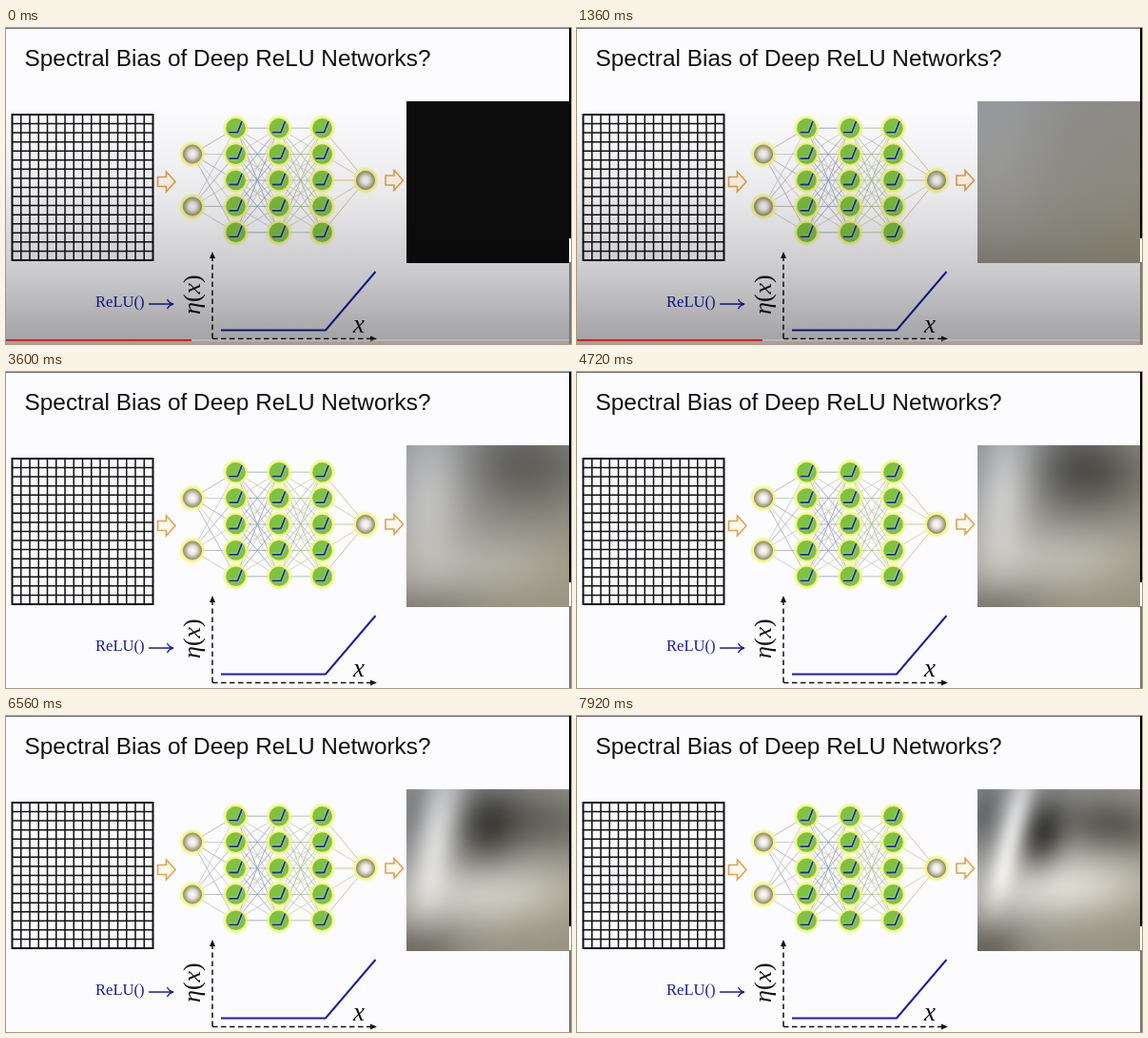
An HTML page with a canvas for the animation above (8 s loop, 594 px wide and 332 px high).

```html
<!DOCTYPE html>
<html lang="en">
<head>
<meta charset="utf-8">
<title>Spectral bias</title>
<style>
html, body { margin: 0; width: 100%; height: 100%; overflow: hidden; background: #fcfbfe; }
svg, canvas, #shade { position: absolute; left: 0; top: 0; }
canvas { left: 421px; top: 76.5px; width: 171px; height: 170.5px; }
#shade { width: 592px; height: 332px; background: linear-gradient(transparent 25%, rgba(0,0,0,.07) 52%, rgba(0,0,0,.2) 78%, rgba(0,0,0,.36)); }
#shade i { position: absolute; left: 0; top: 326.5px; height: 2.5px; width: 592px; background: rgba(255,255,255,.22); }
#shade i + i { width: 195px; background: #d8201c; }
.serif { font-family: "Liberation Serif", "Times New Roman", serif; }
</style>
</head>
<body>
<svg width="594" height="332">
  <defs>
    <radialGradient id="halo">
      <stop offset=".6" stop-color="#f2f562"/>
      <stop offset=".8" stop-color="#f2f57a" stop-opacity=".85"/>
      <stop offset="1" stop-color="#f6f8a0" stop-opacity="0"/>
    </radialGradient>
    <radialGradient id="ball">
      <stop offset="0" stop-color="#fff"/>
      <stop offset=".45" stop-color="#e6e4da"/>
      <stop offset="1" stop-color="#8f8c78"/>
    </radialGradient>
  </defs>
  <text x="19.5" y="40" font-size="24.4" font-family="'Liberation Sans', Arial, sans-serif" fill="#111">Spectral Bias of Deep ReLU Networks?</text>
  <g id="art" fill="none"></g>
  <g class="serif" fill="#111">
    <text x="94" y="293" font-size="16.6" fill="#1c1ca8">ReLU()</text>
    <text x="365" y="320" font-size="27" font-style="italic">x</text>
    <text transform="translate(204 301) rotate(-90)" font-size="26"><tspan font-style="italic">η</tspan>(<tspan font-style="italic">x</tspan>)</text>
  </g>
</svg>
<canvas id="photo" width="57" height="57"></canvas>
<div id="shade"><i></i><i></i></div>
<svg width="594" height="332">
  <path d="M0 .5H594" stroke="#77757a"/>
  <path d="M592 0h2v221h-2z"/>
  <path d="M592 221h2v25h-2z" fill="#fff"/>
  <path d="M592 246h2v86h-2z" fill="#777a78"/>
</svg>
<script>
const art = [];
const path = (d, stroke, width = 1, extra = '') =>
  art.push(`<path d="${d}" stroke="${stroke}" stroke-width="${width}" ${extra}/>`);
const disc = (x, y, r, fill, extra = '') =>
  art.push(`<circle cx="${x}" cy="${y}" r="${r}" fill="${fill}" ${extra}/>`);

// input grid
let mesh = '';
for (let i = 1; i < 16; i++) mesh += `M${6.5 + i * 9.25} 91V244M6 ${91 + i * 9.56}H155`;
path(mesh, '#111', 1.5);
path('M6.5 91H154.5V244H6.5Z', '#111', 2);

// network
const column = (count, k) => Array.from({ length: count }, (_, i) =>
  ({ x: 196 + k * 45.5, y: 160 + (i - (count - 1) / 2) * (count === 2 ? 55 : 27.4) }));
const layers = [2, 5, 5, 5, 1].map(column);
const tints = [['#a9a9b2', '#c3c3c6'], ['#8f9cb8', '#c4c8ba'], ['#a9bd92', '#c9ccb4'], ['#cdb571', '#d5c595']];
tints.forEach((pair, k) => layers[k].forEach((a, i) => layers[k + 1].forEach((b, j) =>
  path(`M${a.x} ${a.y}L${b.x} ${b.y}`, pair[(i + j) % 2], .8))));
layers.forEach(nodes => nodes.forEach(({ x, y }) => {
  disc(x, y, 14.5, 'url(#halo)');
  if (nodes.length < 5) return disc(x, y, 9.6, 'url(#ball)', 'stroke="#8d8a6c" stroke-width=".8"');
  disc(x, y, 10.3, '#7fc242');
  const ramp = `M${x - 7} ${y + 4.5}h9l4.500-11.500`;
  path(ramp, '#d5e8c0', 3.4, 'opacity=".5"');
  path(ramp, '#1d2b9c', 1.8);
}));

// block arrows
for (const [x, y] of [[159.5, 161.5], [399, 160]])
  path(`M${x} ${y - 5}h9v-5.5l9.5 10.5l-9.5 10.5v-5.5h-9z`, '#e3a04a', 1.6, 'fill="#fffaf0"');

// activation plot
path('M217 326V240M217 326.5H384', '#111', 1.5, 'stroke-dasharray="5.5 3.5"');
path('M217 235l-3 7h6zM390 326.5l-7-3v6z', 'none', 0, 'fill="#111"');
path('M226 317.5H336L388.5 256', '#1c1ca8', 2);
path('M150 290H175M169.5 285q2 4 6.5 5q-4.500 1-6.500 5', '#1c1ca8', 1.4);
document.getElementById('art').innerHTML = art.join('');

// Soft spots of light: first and last [x, y, rx, ry, tilt], final gain, growth power
const spots = [
  { from: [.1, .38, .3, .55, 0], to: [.22, .25, .08, .4, .25], gain: 85, power: .6 },
  { from: [.85, 0, .5, .35, 0], to: [.4, .29, .13, .22, .2], gain: -85, power: .8 },
  { from: [.9, .1, .4, .3, 0], to: [.82, .22, .32, .17, .12], gain: -58, power: 1.3 },
  { from: [.5, .82, .45, .2, 0], to: [.5, .6, .55, .21, -.05], gain: 72, power: 1 },
  { from: [.1, 1.05, .4, .15, 0], to: [.03, .98, .25, .17, 0], gain: -48, power: .6 },
  { from: [0, .1, .07, .3, 0], to: [.04, .15, .09, .22, .2], gain: -40, power: 3 }
];
const N = 57, ctx = document.getElementById('photo').getContext('2d');
const image = ctx.createImageData(N, N), shade = document.getElementById('shade');
const clamp = x => Math.max(0, Math.min(1, x));

function draw(t) {
  const wake = clamp((t - 80) / 640), p = clamp((t - 1100) / 6820);
  const base = 13 + 134 * wake, warmth = .85 * wake;
  const blobs = spots.map(({ from, to, gain, power }) => {
    const [x, y, rx, ry, tilt] = from.map((a, i) => a + (to[i] - a) * p);
    return { x, y, rx, ry, c: Math.cos(tilt), s: Math.sin(tilt), gain: gain * p ** power };
  });
  for (let i = 0; i < N * N; i++) {
    const u = (i % N + .5) / N, v = (Math.floor(i / N) + .5) / N;
    let light = base;
    for (const b of blobs) {
      const dx = u - b.x, dy = v - b.y;
      light += b.gain * Math.exp(-(((dx * b.c + dy * b.s) / b.rx) ** 2) - ((dy * b.c - dx * b.s) / b.ry) ** 2);
    }
    const warm = warmth * (u * .45 + v * .55);
    image.data.set([light + 9 * warm - 3 * warmth, light + warm - warmth, light - 28 * warm + 5 * warmth, 255], i * 4);
  }
  ctx.putImageData(image, 0, 0);
  shade.style.opacity = clamp((2960 - t) / 260);
}
const start = performance.now();
function loop() {
  draw((performance.now() - start) % 8000);
  requestAnimationFrame(loop);
}
loop();
</script>
</body>
</html>
```
